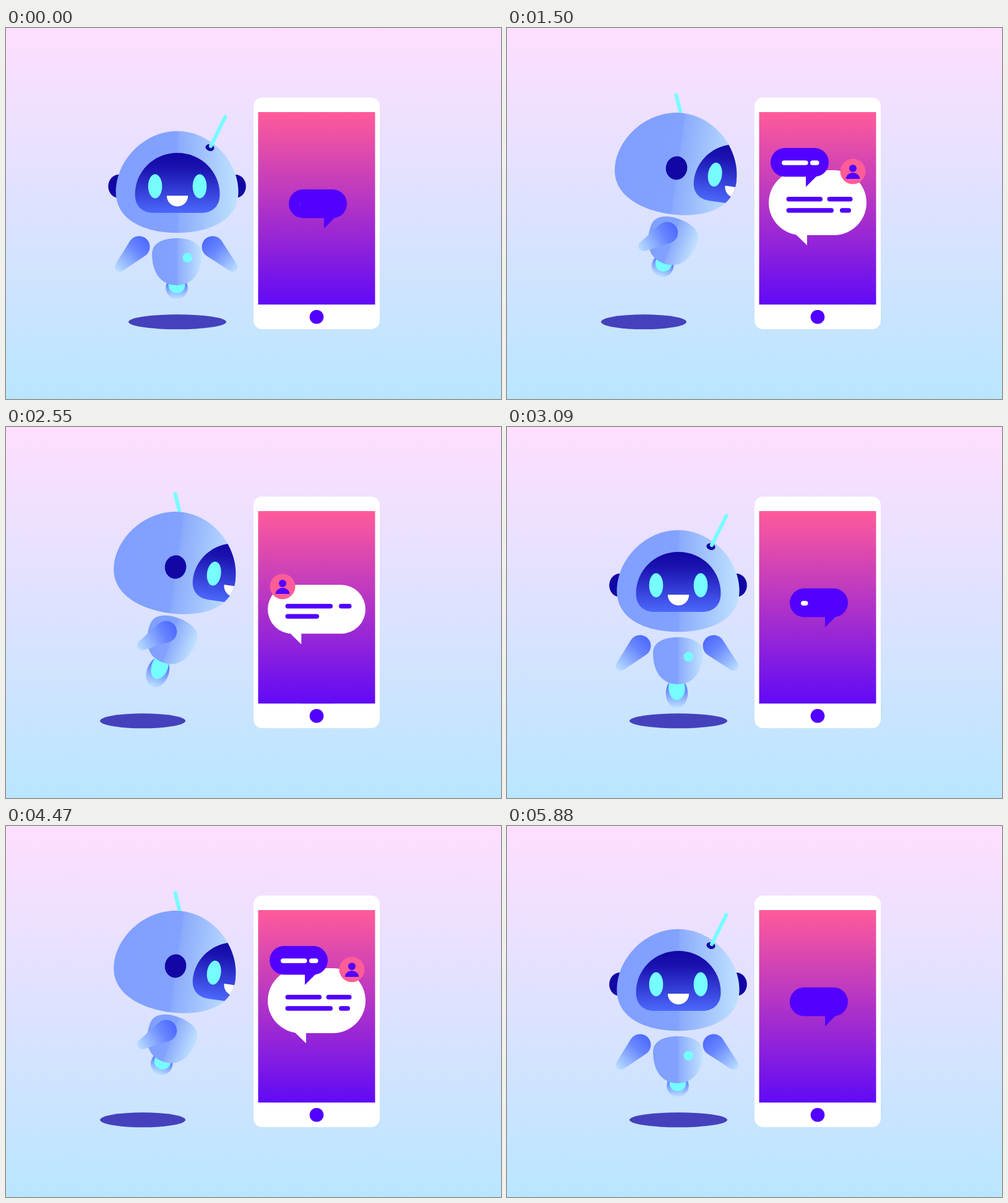
An HTML page with a canvas for the animation above (6 s loop, 800 by 600 pixels).

```html
<!DOCTYPE html>
<html lang="en">
<head>
<meta charset="utf-8">
<title>Chat robot</title>
<style>
  html, body { margin: 0; width: 100%; height: 100%; overflow: hidden; background: #dce2ff; }
  canvas { display: block; width: 800px; height: 600px; }
</style>
</head>
<body>
<canvas id="stage" width="800" height="600"></canvas>
<script>
const ctx = document.getElementById('stage').getContext('2d');
const PERIOD = 3000;
const NAVY = '#1207a5', CYAN = '#76fdff', VIOLET = '#5200ff', PINK = '#ff5c98';
const TAU = Math.PI * 2, RAD = Math.PI / 180;

// timing helpers
const span = (t, a, b) => Math.min(1, Math.max(0, (t - a) / (b - a)));
const easeOut = p => 1 - (1 - p) * (1 - p);
const easeInOut = p => p < 0.5 ? 2 * p * p : 1 - 2 * (1 - p) * (1 - p);
const bump = (t, a, b) => Math.sin(Math.PI * span(t, a, b));

// smooth curve through front (p = 0), half-turned (p = 0.4) and profile (p = 1)
function blend(p, a, b, c) {
  return a * (p - 0.4) * (p - 1) / 0.4 - b * p * (p - 1) / 0.24 + c * p * (p - 0.4) / 0.6;
}
const blendAll = (p, a, b, c) => a.map((v, i) => blend(p, v, b[i], c[i]));

// drawing helpers
function gradient(x0, y0, x1, y1, ...stops) {
  const g = ctx.createLinearGradient(x0, y0, x1, y1);
  stops.forEach(([at, color]) => g.addColorStop(at, color));
  return g;
}

function ellipse(x, y, rx, ry, fill, tilt = 0) {
  ctx.beginPath();
  ctx.ellipse(x, y, Math.max(0, rx), Math.max(0, ry), tilt, 0, TAU);
  ctx.fillStyle = fill;
  ctx.fill();
}

function roundBox(x, y, w, h, r, fill) {
  ctx.beginPath();
  ctx.roundRect(x, y, w, h, r);
  ctx.fillStyle = fill;
  ctx.fill();
}

function triangle(x0, y0, x1, y1, x2, y2, fill) {
  ctx.beginPath();
  ctx.moveTo(x0, y0);
  ctx.lineTo(x1, y1);
  ctx.lineTo(x2, y2);
  ctx.fillStyle = fill;
  ctx.fill();
}

function placed(x, y, tilt, draw) {
  ctx.save();
  ctx.translate(x, y);
  ctx.rotate(tilt * RAD);
  draw();
  ctx.restore();
}

const skin = half => gradient(-half, 0, half, 0,
  [0, '#809fff'], [0.5, '#82a2ff'], [0.52, '#8cacfc'], [1, '#c0e2ff']);

// phone screen
function typed(p, y, ...dashes) {
  const total = dashes.reduce((sum, [a, b]) => sum + b - a, 0);
  let left = total * p;
  for (const [a, b] of dashes) {
    const w = Math.min(left, b - a);
    if (w > 0) roundBox(a, y, w, 7.5, Math.min(3.75, w / 2), ctx.ink);
    left -= w;
  }
}

function avatar(x, y, size, q) {
  ellipse(x, y, 20.5 * size, 20.5 * size, PINK);
  if (q <= 0) return;
  const grow = Math.min(1, 2 * q);
  ellipse(x, y - 5, 6 * q, 6 * q, VIOLET);
  ctx.beginPath();
  ctx.ellipse(x, y + 12, 11.3 * (0.65 + 0.35 * q) * grow,
    (10 + 4 * Math.sin(Math.PI * q)) * grow, 0, Math.PI, TAU);
  ctx.fill();
}

function question(dx, dy, text) {
  placed(dx, dy, 0, () => {
    roundBox(457, 261, 94, 46.5, 23.25, VIOLET);
    triangle(514, 306, 514, 324, 532, 306, VIOLET);
    ctx.ink = '#fff';
    typed(text, 281.2, [475, 517.5], [521, 535.5]);
  });
}

function reply(dy, t) {
  placed(0, dy, 0, () => {
    roundBox(423, 230, 158, 105, 52.5, '#fff');
    triangle(467, 334, 485, 334, 485, 351.5, '#fff');
    ctx.ink = VIOLET;
    typed(span(t, 1050, 1230), 273, [451.5, 510], [517.5, 558.5]);
    typed(span(t, 1230, 1410), 291.2, [451.5, 528], [538, 556]);
  });
}

function secondReply(dy, t) {
  placed(0, dy, 0, () => {
    roundBox(423, 255.3, 158, 79, 39.5, '#fff');
    triangle(459, 333.5, 477.3, 333.5, 477.3, 351.5, '#fff');
    ctx.ink = VIOLET;
    typed(span(t, 1980, 2280), 286, [451.5, 528], [538, 558.5]);
    typed(span(t, 2280, 2490), 302.4, [451.5, 506]);
    avatar(447, 258, easeOut(span(t, 1800, 1920)), span(t, 1890, 2010));
  });
}

function phone(t) {
  roundBox(400, 112.5, 204, 374.5, 14, '#fff');
  ellipse(502, 467.3, 11.3, 11.3, VIOLET);
  ctx.save();
  ctx.beginPath();
  ctx.rect(407.5, 136, 189, 311.3);
  ctx.clip();
  ctx.fillStyle = gradient(0, 136, 0, 447, [0, '#ff5b9a'], [1, '#600af6']);
  ctx.fillRect(407, 136, 190, 312);

  const scroll = easeInOut(span(t, 1560, 1860));
  const up = -235 * scroll;
  if (t >= 630 && scroll < 1) {
    reply(218 * (1 - easeOut(span(t, 630, 1080))) + up, t);
  }
  if (scroll < 1) {
    const push = easeInOut(span(t, 780, 1050));
    question(-31 * push, -67 * push + up, span(t, 0, 450));
    avatar(559, 232 + up, easeOut(span(t, 990, 1140)), span(t, 1080, 1230));
  }
  if (scroll > 0) {
    const leave = easeInOut(span(t, 2550, 2880));
    if (leave < 1) secondReply(195 * (1 - scroll) - 225 * leave, t);
  }
  if (t >= 2520) question(0, 189 * (1 - easeInOut(span(t, 2520, 2880))), 0);
  ctx.restore();
}

// robot
function arm(sx, sy, hx, hy) {
  const r1 = 17.5, r2 = 8;
  const dx = hx - sx, dy = hy - sy, len = Math.hypot(dx, dy);
  const dir = Math.atan2(dy, dx);
  const off = Math.acos(Math.min(1, (r1 - r2) / Math.max(len, 10)));
  const ux = dx / len, uy = dy / len;
  ctx.beginPath();
  ctx.arc(sx, sy, r1, dir + off, dir - off + TAU);
  ctx.arc(hx, hy, r2, dir - off, dir + off);
  ctx.closePath();
  ctx.fillStyle = gradient(sx - ux * r1, sy - uy * r1, hx + ux * r2, hy + uy * r2,
    [0, '#4c69ff'], [0.35, '#6886ff'], [1, '#b8deff']);
  ctx.fill();
}

function flame(s) {
  const bottom = 60 + 32 * s, ry = 18 + 12 * s;
  const x = -3 * s;
  ellipse(x, bottom - ry, 17.8, ry,
    gradient(0, bottom - 2 * ry, 0, bottom, [0, '#3f59f5'], [0.4, '#6d8cff'], [1, '#bce2ff']));
  const inner = 13 + 13 * s;
  ellipse(x, 51 + 24 * s - inner, 13.3, inner, CYAN);
}

function torso(p, s) {
  const [x, y, tilt] = blendAll(p, [276, 378, 0], [275, 363, 0], [266, 345, 20]);
  placed(x, y, tilt, () => {
    flame(s);
  });
  arm(...blendAll(p, [334, 354, 366, 386], [298, 341, 306, 365], [268, 340, 254, 352]));
  placed(x, y, tilt, () => {
    ctx.beginPath();
    ctx.moveTo(0, -38);
    ctx.bezierCurveTo(24, -38, 40, -29, 40, -13);
    ctx.bezierCurveTo(40, 16, 27, 38, 0, 38);
    ctx.bezierCurveTo(-27, 38, -40, 16, -40, -13);
    ctx.bezierCurveTo(-40, -29, -24, -38, 0, -38);
    ctx.fillStyle = skin(40);
    ctx.fill();
    ctx.clip();
    ellipse(blend(p, 17.3, 26, 54), blend(p, -6.5, -5, -4), 7.8, 7.8, CYAN);
  });
  arm(...blendAll(p, [215, 354, 184, 386], [222, 340, 189, 370], [258.7, 331, 220, 353]));
}

function antenna(p) {
  const [bx, by, tx, ty] = blendAll(p,
    [54.5, -58, 78, -105.5], [50, -56, 68.5, -105], [-3, -75, -17, -110]);
  if (p < 0.2) ellipse(53, -55.5, 7.2, 5.3, NAVY, 0.25);
  ctx.beginPath();
  ctx.moveTo(bx, by);
  ctx.lineTo(tx, ty);
  ctx.strokeStyle = CYAN;
  ctx.lineWidth = 6;
  ctx.lineCap = 'round';
  ctx.stroke();
}

function face(p) {
  const [x, y, tilt] = blendAll(p, [0.5, 0, 0], [57.5, 2, 3], [99, 2, 0]);
  placed(x, y, tilt, () => {
    ctx.beginPath();
    ctx.moveTo(0, -47);
    ctx.bezierCurveTo(39, -47, 68.5, -16, 68.5, 20);
    ctx.bezierCurveTo(68.5, 40, 56, 50, 38, 50);
    ctx.lineTo(-38, 50);
    ctx.bezierCurveTo(-56, 50, -68.5, 40, -68.5, 20);
    ctx.bezierCurveTo(-68.5, -16, -39, -47, 0, -47);
    ctx.fillStyle = gradient(0, -47, 0, 50, [0, NAVY], [0.25, '#1a12b0'], [1, '#4c68fc']);
    ctx.fill();
    ellipse(-36, 7, 11.3, 19.5, CYAN);
    ellipse(36, 7, 11.3, 19.5, CYAN);
    ctx.beginPath();
    ctx.arc(0, 22.3, 17.2, 0, Math.PI);
    ctx.fillStyle = '#fff';
    ctx.fill();
  });
}

function head(p, nod) {
  const [x, y, tilt] = blendAll(p, [276.5, 249, 0], [276, 234.3, 0], [275, 219.5, 8]);
  const [ex, ey, er] = blendAll(p, [94, 7, 17.3], [64.5, 4, 13.5], [0, 7, 17.3]);
  placed(x, y, tilt - nod, () => {
    ellipse(ex, ey, er, 19, NAVY);
    if (p < 0.2) ellipse(-ex, ey, er, 19, NAVY);
    else antenna(p);

    ctx.save();
    ctx.beginPath();
    ctx.moveTo(0, -82.3);
    ctx.bezierCurveTo(54, -82.3, 99, -34, 99, 16);
    ctx.bezierCurveTo(99, 63, 50, 82.3, 0, 82.3);
    ctx.bezierCurveTo(-50, 82.3, -99, 63, -99, 16);
    ctx.bezierCurveTo(-99, -34, -54, -82.3, 0, -82.3);
    ctx.fillStyle = skin(99);
    ctx.fill();
    ctx.clip();
    face(p);
    if (p >= 0.2) ellipse(-ex, ey, er, 19, NAVY);
    ctx.restore();

    if (p < 0.2) antenna(p);
  });
}

function robot(t) {
  const p = easeOut(span(t, 630, 1170)) - easeInOut(span(t, 2550, 2880));
  const thrust = 0.88 * bump(t, 0, 450) + bump(t, 630, 870) + bump(t, 2490, 2760);
  const nod = 3 * (easeInOut(span(t, 1560, 1860)) - easeInOut(span(t, 1950, 2250)));
  ellipse(blend(p, 277, 257, 221), 475.3, blend(p, 79, 75.8, 69), 12, '#4541bd');
  torso(p, thrust);
  head(p, nod);
}

function draw(t) {
  ctx.fillStyle = gradient(0, 0, 0, 600, [0, '#ffdeff'], [1, '#b9e6ff']);
  ctx.fillRect(0, 0, 800, 600);
  phone(t);
  robot(t);
}

const start = performance.now();
function tick() {
  draw((performance.now() - start) % PERIOD);
  requestAnimationFrame(tick);
}
tick();
</script>
</body>
</html>
```
